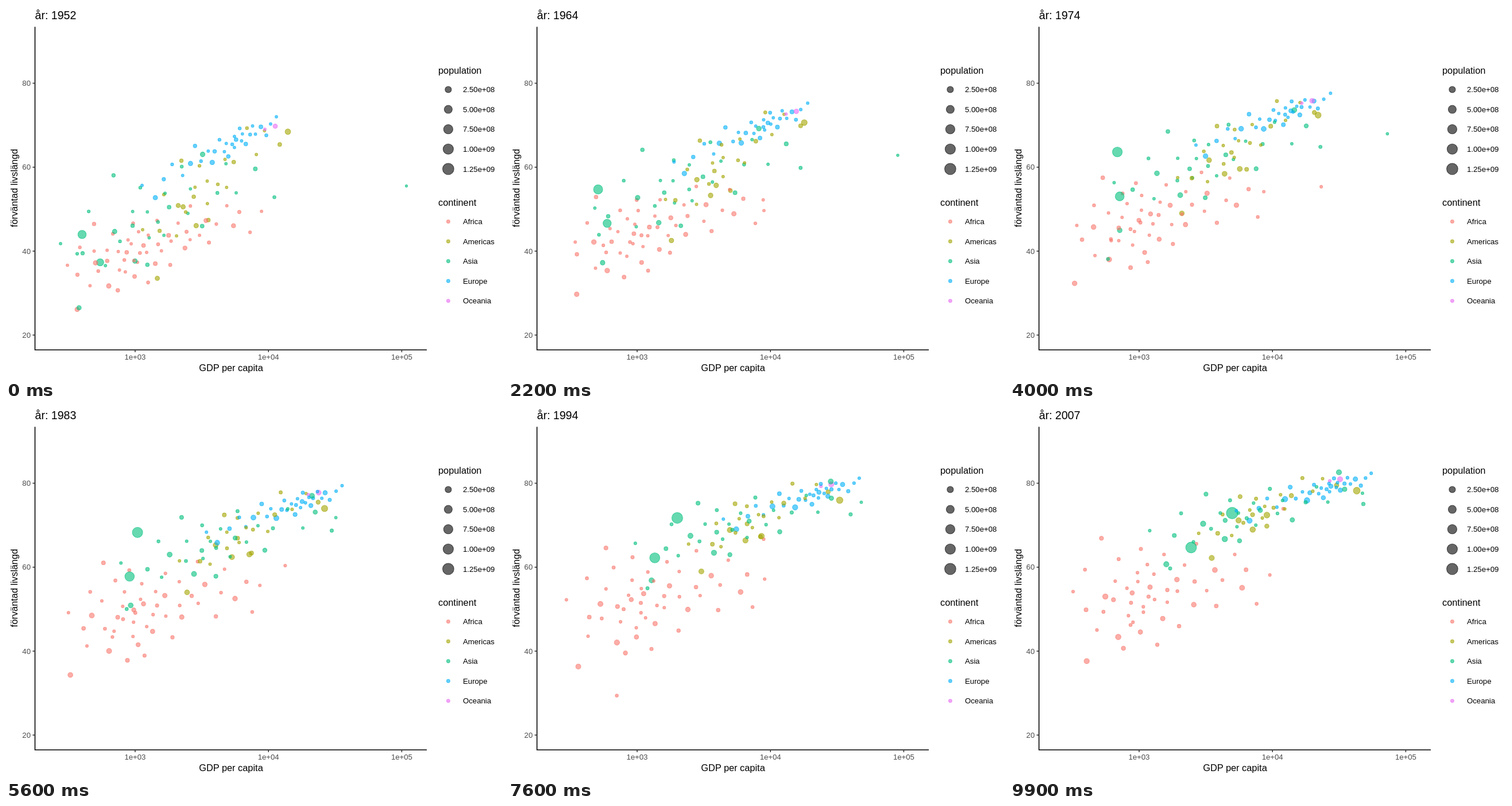
These frames come from a looping animation (864 px wide and 648 px high, 10000 ms). An HTML page:

```html
<!DOCTYPE html>
<html lang="sv">
<head>
<meta charset="utf-8">
<title>Livslängd och BNP</title>
<style>
  html, body { margin: 0; width: 100%; height: 100%; overflow: hidden; background: #fff; }
  svg { display: block; width: 864px; height: 648px; }
  text { font-family: "Liberation Sans", Arial, sans-serif; font-size: 13.2px; }
  .name { font-size: 16.35px; }
  .year { font-size: 19.6px; }
  .tick { fill: #4d4d4d; }
  .axis { fill: none; stroke: #000; stroke-width: 1.58; }
  .mark { stroke: #333; stroke-width: 1.58; }
  circle { fill-opacity: .6; stroke-opacity: .6; stroke-width: 1.05; }
</style>
</head>
<body>
<svg id="chart" viewBox="0 0 864 648">
  <text id="year" class="year" x="50.5" y="22.5">år: 1952</text>
  <path class="axis" d="M50.5 36.3V599H733"/>
  <text class="name" x="392" y="636" text-anchor="middle">GDP per capita</text>
  <text class="name" transform="translate(20 317) rotate(-90)" text-anchor="middle">förväntad livslängd</text>
  <text class="name" x="753" y="118.3">population</text>
  <text class="name" x="753" y="347.6">continent</text>
  <g id="dots"></g>
</svg>
<script>
const chart = document.getElementById('chart');
const layer = document.getElementById('dots');
const yearText = document.getElementById('year');

const FIRST = 1952, SPAN = 55, STEPS = 99;
const colors = {
  Africa: '#F8766D', Americas: '#A3A500', Asia: '#00BF7D', Europe: '#00B0F6', Oceania: '#E76BF3'
};

const mix = (a, b, k) => a + (b - a) * k;
const fract = v => v - Math.floor(v);
const bend = q => q * (.5 + .5 * q * q);
const linear = t => t;
const early = power => t => 1 - (1 - t) ** power;
const late = power => t => t ** power;
const settle = early(1.5);

function add(parent, tag, attrs, text) {
  const el = document.createElementNS('http://www.w3.org/2000/svg', tag);
  for (const key in attrs) el.setAttribute(key, attrs[key]);
  if (text) el.textContent = text;
  return parent.appendChild(el);
}

function circle(parent, color, x, y, r) {
  return add(parent, 'circle', { cx: x, cy: y, r, fill: color, stroke: color });
}

// Axis ticks
for (let i = 0; i < 3; i++) {
  const x = 224.9 + 232.25 * i;
  add(chart, 'path', { class: 'mark', d: `M${x} 599v4.1` });
  add(chart, 'text', { class: 'tick', x, y: 616, 'text-anchor': 'middle' }, '1e+0' + (i + 3));
}
for (let age = 20; age <= 80; age += 20) {
  const y = 719.5 - 7.312 * age;
  add(chart, 'path', { class: 'mark', d: `M50.5 ${y}h-4.1` });
  add(chart, 'text', { class: 'tick', x: 43, y: y + 4.7, 'text-anchor': 'end' }, String(age));
}

// Legends: dot area follows population, in billions
const radius = billions => 2.11 + 7.94 * Math.sqrt(billions / 1.32);

function legendRow(color, y, r, label) {
  circle(chart, color, 770.4, y, r);
  add(chart, 'text', { x: 796, y: y + 4.8 }, label);
}
for (let i = 0; i < 5; i++) {
  const billions = (i + 1) / 4;
  const label = (billions * 1e9).toExponential(2).replace('+', '+0');
  legendRow('#000', 145.5 + 34.58 * i, radius(billions), label);
}
Object.keys(colors).forEach((name, i) => legendRow(colors[name], 375.4 + 34.55 * i, 2.91, name));

// Dots that stand out; a swing is a temporary detour around one year
const leaders = [
  { continent: 'Asia', from: [132.5, 398], to: [387, 186.5], people: [.556, 1.32],
    paceX: late(1.7), paceY: early(2.2), swing: { year: 1961, width: 3, dx: 15, dy: 36 } },
  { continent: 'Asia', from: [164, 446.5], to: [315.5, 246.5], people: [.372, 1.11],
    paceX: late(1.9), paceY: early(1.65) },
  { continent: 'Asia', from: [342.5, 258.5], to: [573, 115.5], people: [.086, .127],
    paceX: early(2.1), paceY: early(1.5) },
  { continent: 'Asia', from: [697.5, 313.5], to: [614, 152], people: [0, .003],
    paceY: early(1.6), swing: { year: 1985.5, width: 7, dx: -85, dy: 0 } },
  { continent: 'Asia', from: [124, 431.5], to: [279, 283], people: [.005, .014],
    swing: { year: 1977, width: 3.5, dx: -30, dy: 130 } },
  { continent: 'Africa', from: [153.5, 427], to: [210, 381.5], people: [.003, .009],
    swing: { year: 1992, width: 4, dx: -10, dy: 153 } },
  { continent: 'Africa', from: [313, 407], to: [476, 179], people: [.001, .006],
    swing: { year: 1973, width: 12, dx: 165, dy: 0 } },
  { continent: 'Americas', from: [491, 219], to: [604, 147.5], people: [.158, .301] },
  { continent: 'Americas', from: [300, 347.5], to: [447.5, 190], people: [.057, .19],
    paceX: early(2.2) }
];

function leaderAt({ from, to, people, paceX = linear, paceY = linear, swing }, t) {
  let x = mix(from[0], to[0], paceX(t));
  let y = mix(from[1], to[1], paceY(t));
  if (swing) {
    const force = Math.exp(-(((FIRST + SPAN * t - swing.year) / swing.width) ** 2));
    x += swing.dx * force;
    y += swing.dy * force;
  }
  return [x, y, radius(mix(people[0], people[1], t))];
}

// The rest: one drifting cloud per continent, reaching left and right of its centre
const clouds = [
  { continent: 'Africa', count: 50, from: [232, 428], to: [238, 330],
    reach: [125, 210], slope: .35, spread: [62, 95] },
  { continent: 'Americas', count: 23, from: [338, 330], to: [430, 188],
    reach: [100, 140], slope: .85, spread: [78, 40] },
  { continent: 'Asia', count: 28, from: [250, 375], to: [400, 195],
    reach: [155, 213], slope: .45, spread: [95, 50] },
  { continent: 'Europe', count: 30, from: [392, 240], to: [550, 144],
    reach: [155, 80], slope: .52, spread: [25, 18] },
  { continent: 'Oceania', count: 2, from: [460, 212], to: [566, 129],
    reach: [9, 9], slope: .3, spread: [0, 0] }
];

function cloudDot({ continent, count, from, to, reach, slope, spread }, i) {
  const rank = bend(2 * i / (count - 1) - 1);
  const off = bend(2 * fract(i * .618 + .3) - 1);
  const people = .002 + .075 * fract(i * .7549 + .2) ** 4;
  const shift = rank * reach[rank < 0 ? 0 : 1];
  return {
    continent,
    at(t) {
      const k = settle(t);
      const height = mix(spread[0], spread[1], k) * (1 - .4 * rank);
      const drift = height / 12 * Math.sin(i * 1.7 + 6 * t);
      return [
        mix(from[0], to[0], k) + shift + drift,
        mix(from[1], to[1], k) - slope * (1 - .45 * k) * shift + height * off,
        radius(people * (1 + t))
      ];
    }
  };
}

const dots = leaders.map(leader => ({
  continent: leader.continent,
  at: t => leaderAt(leader, t)
}));
for (const cloud of clouds) {
  for (let i = 0; i < cloud.count; i++) dots.push(cloudDot(cloud, i));
}

// Shuffle the stacking so that continents overlap evenly
dots.forEach((dot, i) => { dot.order = fract(i * .618); });
dots.sort((a, b) => a.order - b.order);
dots.forEach(dot => { dot.el = circle(layer, colors[dot.continent], 0, 0, 0); });

function draw(step) {
  const t = step / STEPS;
  yearText.textContent = 'år: ' + Math.round(FIRST + SPAN * t);
  for (const dot of dots) {
    const [x, y, r] = dot.at(t);
    dot.el.setAttribute('cx', x.toFixed(2));
    dot.el.setAttribute('cy', y.toFixed(2));
    dot.el.setAttribute('r', r.toFixed(2));
  }
}

const start = performance.now();
let shown = -1;
function tick() {
  const step = Math.floor((performance.now() - start) % 10000 / 100);
  if (step !== shown) draw(shown = step);
  requestAnimationFrame(tick);
}
tick();
</script>
</body>
</html>
```
